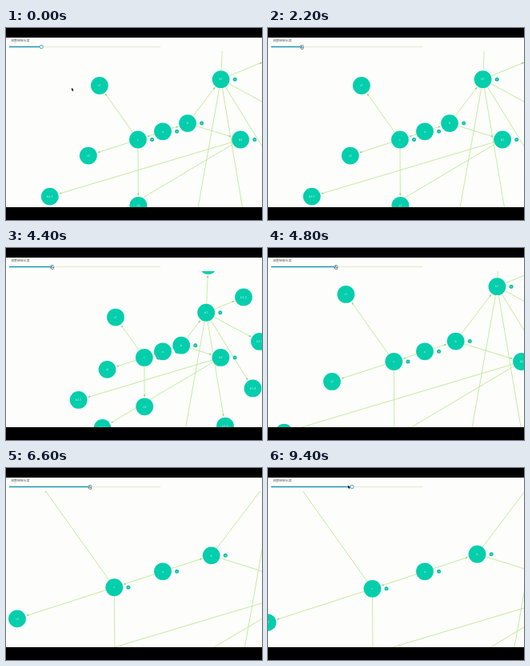
Write an HTML page with a canvas that moves like this. It is 320 px wide and 240 px high and loops after 10 s.

```html
<!DOCTYPE html>
<html lang="zh">
<head>
<meta charset="utf-8">
<title>Edge length slider</title>
<style>
  html, body { margin: 0; width: 100%; height: 100%; overflow: hidden; background: #000; }
  canvas { display: block; width: 320px; height: 240px; }
</style>
</head>
<body>
<canvas id="stage"></canvas>
<script>
const LOOP = 10000, STEP = 200;
const LAG = 400; // the graph follows the slider with this delay
const ROOT = { x: 196, y: 129.3 }, RADIUS = 10.9;
const TOP = 29, BOTTOM = 224;

// label, x and y offset from the root at scale 1, parent label
const nodes = [
  ['a', 0, 0],
  ['b', 31, -10.2, 'a'],
  ['c', -31, 10.2, 'a'],
  ['b1', 72.5, -65, 'b'],
  ['b2', 97, 10.2, 'b'],
  ['c1', -79, -57.2, 'c'],
  ['c2', -93, 30.2, 'c'],
  ['c3', -30.5, 92.4, 'c'],
  ['b1-1', 76, -143.5, 'b1'],
  ['b1-2', 135.2, -90.8, 'b1'],
  ['b1-3', 162, -16.5, 'b1'],
  ['b1-4', 150.6, 61.8, 'b1'],
  ['b1-5', 104.4, 124.8, 'b1'],
  ['b1-6', 32.5, 160, 'b1'],
  ['b2-1', -141, 81.2, 'b2'],
  ['b2-2', -101, 128, 'b2']
].map(([label, x, y, parent]) => ({ label, x, y, parent }));
const byLabel = Object.fromEntries(nodes.map(n => [n.label, n]));
const parents = new Set(nodes.map(n => n.parent));

// [time, value] keys
const handleKeys = [
  [2000, 44.2], [2800, 37.2], [3200, 30.3],
  [4000, 30.3], [4800, 85],
  [5800, 85], [6500, 105]
];
const pointerX = [[0, 83], [1200, 44.6], ...handleKeys, [7200, 105], [7400, 101]];
const pointerY = [[0, 76], [1200, 23.8], [7200, 23.8], [7400, 23]];

function valueAt(keys, t) {
  if (t <= keys[0][0]) return keys[0][1];
  for (let i = 1; i < keys.length; i++) {
    const [t0, a] = keys[i - 1], [t1, b] = keys[i];
    if (t < t1) return a + (b - a) * (t - t0) / (t1 - t0);
  }
  return keys[keys.length - 1][1];
}

const canvas = document.getElementById('stage');
const ctx = canvas.getContext('2d');
const ratio = window.devicePixelRatio || 1;
canvas.width = 320 * ratio;
canvas.height = 240 * ratio;
ctx.scale(ratio, ratio);

function line(x0, y0, x1, y1, color, width) {
  ctx.strokeStyle = color;
  ctx.lineWidth = width;
  ctx.beginPath();
  ctx.moveTo(x0, y0);
  ctx.lineTo(x1, y1);
  ctx.stroke();
}

function disc(x, y, r, fill) {
  ctx.fillStyle = fill;
  ctx.beginPath();
  ctx.arc(x, y, r, 0, Math.PI * 2);
  ctx.fill();
}

function polygon(points, fill) {
  ctx.fillStyle = fill;
  ctx.beginPath();
  points.forEach(([x, y]) => ctx.lineTo(x, y));
  ctx.closePath();
  ctx.fill();
}

function drawEdge(from, to) {
  const dx = to.x - from.x, dy = to.y - from.y, d = Math.hypot(dx, dy);
  ctx.save();
  ctx.translate(from.x, from.y);
  ctx.rotate(Math.atan2(dy, dx));
  const end = d - RADIUS - 1.5;
  line(RADIUS, 0, end, 0, '#bce894', 0.8);
  polygon([[end, 0], [end - 2.6, -1.2], [end - 2.6, 1.2]], '#8fcf78');
  ctx.restore();
}

function drawNode({ x, y }, label) {
  disc(x, y, RADIUS, '#04ceac');
  ctx.fillStyle = '#c9f7e8';
  ctx.font = '3.6px "Noto Sans", sans-serif';
  ctx.textAlign = 'center';
  ctx.textBaseline = 'middle';
  ctx.fillText(label, x, y + 0.2);
  if (parents.has(label)) {
    disc(x + 17.6, y, 2.5, '#10bfa8');
    line(x + 16.5, y, x + 18.7, y, '#b8efe2', 0.6);
  }
}

function drawGraph(t) {
  const scale = 0.747 + (valueAt(handleKeys, t - LAG) - 30.3) * 0.0183;
  const place = n => ({ x: ROOT.x + n.x * scale, y: ROOT.y + n.y * scale });
  ctx.save();
  ctx.beginPath();
  ctx.rect(0, TOP, 320, BOTTOM - TOP);
  ctx.clip();
  nodes.forEach(n => n.parent && drawEdge(place(byLabel[n.parent]), place(n)));
  nodes.forEach(n => drawNode(place(n), n.label));
  ctx.restore();
}

function drawSlider(t) {
  const x = valueAt(handleKeys, t);
  ctx.fillStyle = '#666';
  ctx.font = '3.9px "Noto Sans CJK SC", "Noto Sans CJK", sans-serif';
  ctx.textAlign = 'left';
  ctx.textBaseline = 'alphabetic';
  ctx.fillText('调整链接长度', 6.2, 17.4);
  line(4, 23.5, 193, 23.5, '#e9ecd6', 1.3);
  line(4, 23.5, x, 23.5, '#1d9bb5', 1.7);
  disc(x, 23.5, 2.5, '#5aa9c4');
  disc(x, 23.5, 1.6, '#fff');
}

function drawPointer(t) {
  ctx.save();
  ctx.translate(valueAt(pointerX, t), valueAt(pointerY, t));
  if (t >= 1200 && t < 9400) {
    polygon([[-0.7, -1.2], [0.2, -1.2], [0.4, 0.2], [2, 0.8], [1.6, 3], [-0.8, 3], [-2, 1]], '#555');
    polygon([[-0.3, -0.6], [0, 0.7], [1.4, 1.2], [1.1, 2.4], [-0.5, 2.4], [-1.1, 1.2]], '#f4f4f4');
  } else {
    polygon([[-1, -1.2], [-1, 2.5], [0, 1.8], [0.7, 3.2], [1.3, 2.9], [0.7, 1.5], [1.8, 1.4]], '#111');
  }
  ctx.restore();
}

function draw(now) {
  const t = Math.floor(now % LOOP / STEP) * STEP;
  ctx.fillStyle = '#000';
  ctx.fillRect(0, 0, 320, 240);
  ctx.fillStyle = '#fdfdfb';
  ctx.fillRect(0, 12, 320, BOTTOM - 12);
  drawGraph(t);
  drawSlider(t);
  drawPointer(t);
}

let start;
function tick(now) {
  start ??= now;
  draw(Math.max(0, now - start));
  requestAnimationFrame(tick);
}
draw(0);
requestAnimationFrame(tick);
</script>
</body>
</html>
```
